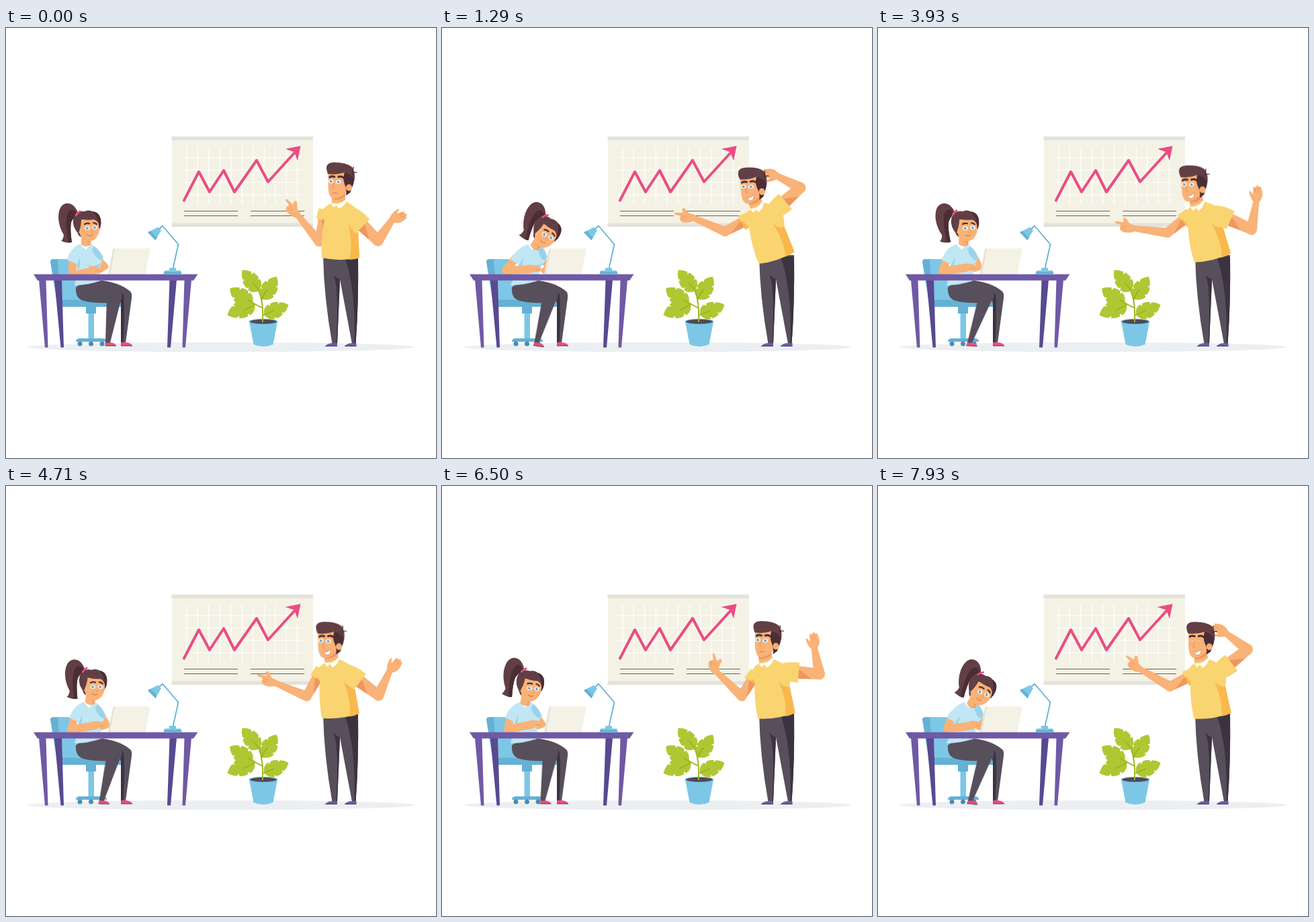
An HTML page without scripts for the animation above (8000 ms loop, 640 by 640 pixels).

```html
<!DOCTYPE html>
<html lang="en">
<head>
<meta charset="utf-8">
<title>Presentation at the office</title>
<style>
html,body{margin:0;width:100%;height:100%;overflow:hidden;background:#fff}
svg{display:block;width:100%;height:100%}
.m{animation:8s cubic-bezier(.35,.22,.65,.78) infinite}
.skin{fill:#f9b277}.shade{fill:#f0965f}
.hair{fill:#613f44}.hair2{fill:#4b2d35}
.blue{fill:#7dc7e6}.blue2{fill:#64b1d5}
.pants{fill:#574f5c}.pants2{fill:#3b3340}
.shirt{fill:#f9d470}.shirt2{fill:#f9b84c}
.top{fill:#c1e7f4}.top2{fill:#9cd2e8}
.line{fill:none;stroke-linecap:round;stroke-linejoin:round}
.brow{stroke:#4b2d35;stroke-width:2.2}
.arm{stroke:#f9b277;stroke-width:12}
.pink{fill:#e94d83}

/* The poses repeat every 6 s; the loop is cut at 8 s. */
@keyframes lean{
0%,75%{rotate:0deg}6.25%,81.25%{rotate:-9deg}16.125%,91.125%{rotate:-19deg}
24.125%,99.125%,100%{rotate:-9.5deg}33.875%{rotate:-2deg}49.125%{rotate:-14deg}67.875%{rotate:-1deg}}
@keyframes manHead{
0%,75%{translate:498px 228px;rotate:0deg}
6.25%,81.25%{translate:484.5px 229px;rotate:0deg}
16.125%,91.125%{translate:463px 235px;rotate:-4deg}
24.125%,99.125%,100%{translate:480.5px 230px;rotate:-1deg}
33.875%{translate:494px 229.5px;rotate:0deg}
49.125%{translate:470px 232px;rotate:-3deg}
67.875%{translate:494.5px 228px;rotate:0deg}}
@keyframes pointUpper{
0%,75%{translate:474px 278px;rotate:101deg}
6.25%,81.25%{translate:464px 284px;rotate:122deg}
16.125%,91.125%{translate:453px 286px;rotate:152deg}
24.125%,99.125%,100%{translate:465px 283px;rotate:153deg}
33.875%{translate:477px 278px;rotate:158deg}
49.125%{translate:459px 282px;rotate:141deg}
67.875%{translate:473px 278px;rotate:100deg}}
@keyframes pointFore{
0%,75%{translate:41px;rotate:130deg}
6.25%,81.25%{translate:34px;rotate:102deg}
16.125%,91.125%{translate:36px;rotate:51deg}
24.125%,99.125%,100%{translate:34px;rotate:57deg}
33.875%{translate:34.5px;rotate:59.5deg}
49.125%{translate:36px;rotate:46deg}
67.875%{translate:40px;rotate:117deg}}
@keyframes pointHand{
0%,75%{rotate:-7deg}6.25%,81.25%{rotate:28deg}16.125%,91.125%{rotate:-20deg}
24.125%,99.125%,100%{rotate:5deg}33.875%{rotate:30deg}49.125%{rotate:4deg}67.875%{rotate:-16deg}}
@keyframes waveUpper{
0%,75%{translate:516px 279px;rotate:45deg}
6.25%,81.25%{translate:509px 275px;rotate:5.4deg}
16.125%,91.125%{translate:494px 272px;rotate:-41deg}
24.125%,99.125%,100%{translate:508px 276px;rotate:-38deg}
33.875%{translate:516px 280px;rotate:-22.5deg}
49.125%{translate:505px 276px;rotate:25deg}
67.875%{translate:514px 279px;rotate:48.6deg}}
@keyframes waveFore{
0%,75%{translate:53px;rotate:-100.5deg}
6.25%,81.25%{translate:53px;rotate:-106.5deg}
16.125%,91.125%{translate:52px;rotate:-112deg}
24.125%,99.125%,100%{translate:53px;rotate:-105deg}
33.875%{translate:57px;rotate:-121deg}
49.125%{translate:56px;rotate:-105deg}
67.875%{translate:56px;rotate:-100.5deg}}
@keyframes waveHand{
0%,75%{translate:39px;rotate:39deg}
6.25%,81.25%{translate:41px;rotate:10deg}
16.125%,91.125%{translate:40px;rotate:-14deg}
24.125%,99.125%,100%{translate:41px;rotate:-7deg}
33.875%{translate:43px;rotate:-17deg}
49.125%{translate:44px;rotate:-5deg}
67.875%{translate:40px;rotate:47deg}}
@keyframes smile{
0%,6.25%,75%,81.25%{scale:.2;opacity:0}
11%,64%,86%,100%{scale:1;opacity:1}
67.875%{scale:.8;opacity:1}
72%{scale:.3;opacity:0}}
@keyframes frown{
0%,6.25%,75%,81.25%{opacity:1}
9%,70%,84%,100%{opacity:0}}
@keyframes blink{
0%,22.8%,25.4%,97.8%{scale:1 1}
24.125%,99.125%,100%{scale:1 .1}}

@keyframes womanHead{
0%,75%{translate:121px 293px;rotate:0deg}
6.25%,81.25%{translate:131px 296px;rotate:11deg}
16.125%,91.125%{translate:155px 303px;rotate:32deg}
24.125%,99.125%,100%{translate:154px 302px;rotate:28deg}
33.875%{translate:152.5px 300.5px;rotate:25deg}
49.125%{translate:130px 293px;rotate:1deg}
67.875%{translate:129.5px 295px;rotate:9deg}}
@keyframes pony{
0%,75%{translate:107px 275px;rotate:0deg}
6.25%,81.25%{translate:122px 273px;rotate:12deg}
16.125%,91.125%{translate:154px 279px;rotate:23deg}
24.125%,99.125%,100%{translate:153px 278px;rotate:23deg}
33.875%{translate:149px 277px;rotate:20deg}
49.125%{translate:114px 274px;rotate:-4deg}
67.875%{translate:120px 272px;rotate:8deg}}
@keyframes bend{
0%,75%{transform:skewX(0deg)}6.25%,81.25%{transform:skewX(-5deg)}
16.125%,91.125%{transform:skewX(-16.5deg)}24.125%,99.125%,100%{transform:skewX(-17deg)}
33.875%{transform:skewX(-17deg)}49.125%{transform:skewX(-6deg)}67.875%{transform:skewX(-4deg)}}
@keyframes nearArm{
0%,75%{d:path("M99 344L99 369L130 361")}
6.25%,81.25%{d:path("M102 344L98 362L134 355")}
16.125%,91.125%{d:path("M110 342L95 361L131 359")}
24.125%,99.125%,100%{d:path("M111 342L103 361L139 357")}
33.875%{d:path("M110 342L99 361L136 359")}
49.125%{d:path("M103 343L96 362L131 357")}
67.875%{d:path("M102 344L98 363L133 356")}}
@keyframes nearHand{
0%,75%{translate:131px 361px}6.25%,81.25%{translate:137px 355px}
16.125%,91.125%{translate:135px 359px}24.125%,99.125%,100%{translate:143px 356px}
33.875%{translate:140px 359px}49.125%{translate:135px 357px}67.875%{translate:137px 356px}}
@keyframes farArm{
0%,75%{d:path("M138 344L148 355L138 361")}
6.25%,81.25%{d:path("M142 343L150 355L142 358")}
16.125%,91.125%{d:path("M150 345L159 357L152 361")}
24.125%,99.125%,100%{d:path("M150 342L157 354L150 359")}
33.875%{d:path("M150 344L158 357L148 361")}
49.125%{d:path("M146 344L151 356L141 359")}
67.875%{d:path("M143 344L151 356L142 359")}}
@keyframes shin{
0%,75%{transform:skewX(0deg)}6.25%,81.25%{transform:skewX(-1.2deg)}
16.125%,91.125%{transform:skewX(-8.5deg)}24.125%,99.125%,100%{transform:skewX(-11.3deg)}
33.875%{transform:skewX(-13.3deg)}49.125%{transform:skewX(-12deg)}67.875%{transform:skewX(-3.3deg)}}
@keyframes foot{
0%,33.875%,75%{rotate:0deg}6.25%,67.875%,81.25%{rotate:0deg}
16.125%,91.125%{rotate:8deg}24.125%,99.125%,100%{rotate:6deg}49.125%{rotate:4deg}}
</style>
</head>
<body>
<svg viewBox="0 0 640 640">
<defs>
<path id="leaf" d="M0 0Q2-11 12-13L14-9.500L16-13Q23-14 28-10.500L27-7.500L31-9Q38-6 42 0Q37 6 31 9L27.500 6.500L28 10.500Q22 13 17 12.500L14 9L13.500 12.500Q4 11 0 0Z"/>
<g id="eye"><ellipse rx="3.700" ry="2.900" fill="#fff"/><circle r="2.300" fill="#7fc0e3"/><circle r=".9" fill="#4b7391"/><circle cx="1" cy="-1" r=".7" fill="#fff"/></g>
<pattern id="grid" x="260.6" y="183.5" width="16.5" height="18.5" patternUnits="userSpaceOnUse"><path d="M8.25 0V18.5M0 9.25H16.5" stroke="#fff" stroke-width="1.2"/></pattern>
</defs>

<ellipse cx="321" cy="475" rx="288" ry="7.2" fill="#eceff2"/>

<!-- board -->
<path d="M247 162H457V296H247Z" fill="#f4f2e5"/>
<path d="M246.500 161.500H457V167H246.500ZM246.500 290.500H457V296H246.500Z" fill="#e3e2db"/>
<path d="M262 177H440V262H262Z" fill="url(#grid)"/>
<path class="line" d="M265 256.500L287 214L303 244L324 212L340 244L373 197L390 229L431 184" stroke="#e94d83" stroke-width="4"/>
<path class="pink" d="M438.500 175.500L415.500 180L429 184.500L434 197.500Z"/>
<path d="M265 272.500H345M364 272.500H444M265 279.500H345M364 279.500H444" stroke="#66645f"/>

<!-- plant -->
<path class="blue" d="M362 437L368.500 471Q383 477.500 397.500 471L404 437Z"/>
<ellipse class="blue2" cx="383" cy="437" rx="21.300" ry="4.200"/>
<ellipse cx="383" cy="437" rx="19.500" ry="3.200" fill="#4f4955"/>
<g fill="#b0c733">
<use href="#leaf" transform="translate(377 391)rotate(-129)scale(.95)"/>
<use href="#leaf" transform="translate(382 404)rotate(-58)scale(.95)"/>
<use href="#leaf" transform="translate(367 411)rotate(-145)scale(.98)"/>
<use href="#leaf" transform="translate(370 410)rotate(157)scale(1.05)"/>
<use href="#leaf" transform="translate(384 427)rotate(-22)scale(.94)"/>
</g>
<path class="line" d="M382 437Q383 400 374 387L368 380M380 406Q383 396 389 390M382 417Q372 412 360 405M371 411Q362 417 354 420M382 428L398 421" stroke="#9bb51f" stroke-width="1.900"/>

<!-- chair -->
<path class="blue2" d="M66 348q0-4 4-4h14l8 71h-10q-5 0-6-6z"/>
<path class="blue" d="M77 348q0-4 4-4h22l6 60h63v5H83z"/>
<path class="blue2" d="M83 404.500H172V415H88Q84 415 83 409ZM119 415H134V425H119ZM104 467Q104 462 110 462H144Q150 462 150 467Z"/>
<path class="blue" d="M122.500 425H131V462H122.500Z"/>
<g fill="#4a8db2"><circle cx="110" cy="470" r="3.500"/><circle cx="126.500" cy="470" r="3.500"/><circle cx="143" cy="470" r="3.500"/></g>

<!-- woman -->
<path class="pants" d="M136 375Q170 378 186 393Q188 397 187 402L178 469H171V410Q165 392 136 375Z"/>
<path class="pants2" d="M143 380Q168 387 175 397Q177 420 174.500 469H171V400Z"/>
<path class="pink" d="M171 473V468Q176 467 179 468Q187 469 188 473Z"/>
<path d="M171 472.500H188V473.500H171Z" fill="#5b3c50"/>
<g class="m" style="animation-name:shin;transform-origin:165px 398px">
<g class="m" style="animation-name:foot;transform-origin:151px 469px"><path class="pink" d="M147.500 473V468Q151 467 155 468Q163 469 164 473Z"/><path d="M147.500 472.500H164V473.500H147.500Z" fill="#5b3c50"/></g>
<path class="pants" d="M150 400Q164 410 173 397L155 468.500H148Z"/>
</g>
<path class="pants" d="M104 386Q120 371 148 379Q177 387 172 402Q166 409 152 409Q120 410 109 403Q103 397 104 386Z"/>

<path class="line arm m" style="animation-name:farArm;stroke-width:9" d="M138 344L148 355L138 361"/>
<g class="m" style="animation-name:pony">
<path class="hair" d="M1 2Q-5-15-17-14Q-29-12-29 8Q-28 22-21 33Q-22 40-25 42Q-15 46-9 44Q-12 24-10 14Q-6 5 1 2Z"/>
<path class="hair2" d="M0 2Q-9-10-15 0Q-20 14-14 44L-9 44Q-12 24-10 14Q-6 5 0 2Z"/>
</g>
<g class="m" style="animation-name:bend;transform-origin:120px 382px">
<path class="top" d="M112 321Q96 326 94 342L105 350L106 362L102 383Q122 383 141 376L139 356L145 342Q137 326 126 321Z"/>
<path class="top2" d="M106 332Q114 346 107 362L105 350ZM128 330Q132 342 142 346L145 342Q139 330 131 325ZM117 351Q130 358 140 350L139 355Q128 359 117 351Z"/>
<path d="M110 322L119 330L127 321L123 318H112Z" fill="#fff"/>
</g>
<path class="line arm m" style="animation-name:nearArm" d="M99 344L99 369L130 361"/>
<g class="m" style="animation-name:nearHand"><path class="skin" d="M-8-5.500Q1-8 8-4.500L13-1Q13 3 8 4L-7 5Z"/><path class="line" d="M3 0L10 1" stroke="#f0965f"/></g>
<g class="m" style="animation-name:bend;transform-origin:120px 382px"><path class="top" d="M112 322Q95 327 91 345L106 352Q111 340 112 332Z"/></g>
<g class="m" style="animation-name:womanHead">
<path class="shade" d="M-9 15H5L5 29Q-1 35-9 29Z"/>
<path class="skin" d="M-9 15V29Q-4 33 0 31L5 27Q-3 26-5 18Z"/>
<path class="hair2" d="M-15-10Q-20 10-10 18L2 0L19 6Q21-8 10-12Z"/>
<path class="skin" d="M-12-8V10Q-9 24 1 25Q15 24 18 8L17-8Z"/>
<ellipse class="skin" cx="-12" cy="8.500" rx="3.500" ry="4.300"/>
<path class="hair" d="M-11 6Q-13 12-12 14Q-23 4-21-9Q-18-22-4-20Q2-23 8-20Q22-18 20 1L18 5Q18-5 10-8Q-2-6-9-9Q-9 0-11 6Z"/>
<path class="hair2" d="M8-20Q22-18 20 1L18 5Q18-9 8-20Z"/>
<use href="#eye" x="0" y="5"/><use href="#eye" x="11" y="4"/>
<path class="line brow" d="M-4-1Q-1-3 3-2M9-3Q12-3 14-1"/>
<path class="line" d="M7 6L8 11L5 11" stroke="#f0965f"/>
<path class="line" d="M0 15Q4 18 8 15" stroke="#d87950" stroke-width="1.200"/>
</g>
<g class="m" style="animation-name:pony"><path class="line" d="M-3 4Q-1 0 3-2" stroke="#e94d83" stroke-width="2.800"/></g>

<!-- desk -->
<path d="M152 366.500L159 330Q159.500 328 162 328H213Q215 328 214.500 330L207.500 366.500Z" fill="#f4f2e5"/>
<path d="M152 366.500L159 330Q159.500 328 162 328L155 366.500Z" fill="#e5e3d9"/>
<path d="M72 375H83L86 475.500H81.500ZM243.500 375H254L245 475.500H240Z" fill="#594990"/>
<path d="M49 375H59.500L62.500 475.500H58ZM265.500 375H276L267 475.500H262.500ZM41 366.400H285.500L279 375.800H47Z" fill="#7059a5"/>
<path class="line" d="M248.500 358L256.500 322L233 294.500L227 300" stroke="#64b1d5" stroke-width="1.800"/>
<path class="blue" d="M236 361H260L261.500 366.500H234.500ZM243 357H253V362H243ZM226 296.500L231 301L222.500 316L211 304Z"/>
<path class="blue2" d="M234.500 366.500L235.500 363H260.500L261.500 366.500ZM211 304L222.500 316L224.500 312L215 302Z"/>

<!-- man -->
<path class="pants" d="M472 338H524Q525 410 520.500 470H515L497 374L493 470H485.500Q473 400 472 338Z"/>
<path class="pants2" d="M504 340H524Q525 410 520.500 470H518.500Q521 390 504 340ZM487 367Q493 373 497 374L493 470H491.500Q496 384 487 367Z"/>
<path d="M475 474Q478 469 487 469H493V474ZM504 474Q507 469 516 469H521.500V474Z" fill="#7059a5"/>
<path d="M475 473H493V474H475ZM504 473H521.500V474H504Z" fill="#493b73"/>
<g class="m" style="animation-name:pointUpper">
<path class="skin" d="M0-8L38-7V7L0 8Z"/>
<path class="shade" d="M5-8L30-7L8 3Z"/>
<g class="m" style="animation-name:pointFore;translate:41px">
<circle class="skin" r="7.300"/><path class="skin" d="M0-7.300L54-4V4.300L0 7.300Z"/>
<g transform="translate(53 0)"><g class="m" style="animation-name:pointHand">
<path class="skin" d="M-3-4.500C3-8 10-9 15-7C19-5 19-1 17 1.500L26 3Q28.500 5 25.500 6L14 6.500L16 11Q15.500 14.500 12 13L5 6L-3 4.500Z"/>
<path class="line" d="M10-3L16-2M10 1L17 1.500" stroke="#f0965f" stroke-width=".8"/>
</g></g></g>
<path class="shirt" d="M-8-11L8-12L8 11L-8 10Z"/><path class="shirt2" d="M-8-11L8-12L8 3Z"/>
</g>
<g class="m" style="animation-name:lean;transform-origin:498px 342px">
<path class="shade" d="M485 242H505V260Q494 270 485 263Z"/>
<path class="skin" d="M485 254Q497 258 505 250V260Q494 270 485 263Z"/>
<path class="shirt" d="M486 260Q473 265 469 276L474 286Q468 316 470 342Q498 348 526 342L524 302Q529 288 528 276Q518 264 506 258Z"/>
<path class="shirt2" d="M509 291Q514 302 524 302L526 342Q519 345 511 345Q517 322 509 291Z"/>
<path d="M484 261L487 267L492 264L495 269Q503 266 507 258L504 256Q496 264 487 261Z" fill="#fff"/>
</g>
<g class="m" style="animation-name:waveUpper">
<path class="skin" d="M0-10L52-8V8L0 10Z"/>
<path class="shade" d="M20 10L22-4L42 8.300Z"/>
<g class="m" style="animation-name:waveFore;translate:53px">
<circle class="skin" r="8.300"/><path class="skin" d="M0-8.300L42-4.300V4.300L0 8.300Z"/>
<g class="m" style="animation-name:waveHand;translate:40px">
<path class="skin" d="M-3-4.300Q3-10 11-12Q15-12 12-9.500L8-6L18-6.500Q22-5.500 18-3.500L21-2Q24 0 20 1L20 2.500Q22 5 18 5.500Q10 9.500 4 7.500L-3 4.300Z"/>
<path class="line" d="M12-3L18-3.500M12 1L20 1" stroke="#f0965f" stroke-width=".8"/>
</g></g>
<path class="shirt" d="M-12-7Q0-15 22-14L22 16Q8 15 0 13Q-10 8-12-7Z"/>
</g>
<g class="m" style="animation-name:manHead">
<path class="skin" d="M-18.500-14V8Q-18 26-9 26Q2 25 10 14V-14Z"/>
<path class="hair" d="M-19-11Q-26-28-9-28Q9-28 17-21Q24-10 19 4L14 17L8 21Q10 12 6 4Q3-4 6-13Q-7-9-19-11Z"/>
<path class="hair2" d="M6-13Q16-10 20-3L19 4L14 17L8 21Q10 12 6 4Q3-4 6-13Z"/>
<path class="line" d="M18-10L19-21M18-12Q21-14 24-13" stroke="#4b2d35" stroke-width="1.300"/>
<ellipse class="skin" cx="12.500" cy="9.500" rx="4.500" ry="5"/>
<path class="line" d="M11 11Q12 7 15 7" stroke="#f0965f"/>
<g transform="translate(1.800 0)">
<g transform="translate(-16 0)"><use class="m" style="animation-name:blink" href="#eye"/></g>
<g transform="translate(-5 1)"><use class="m" style="animation-name:blink" href="#eye"/></g>
<path class="line brow" style="stroke-width:3" d="M-18-6Q-16-8-11-6.500M-5-6.500Q-1-8 3-5"/>
<path class="line" d="M-12 3L-14 9L-11 10" stroke="#f0965f" stroke-width="1.300"/>
<path class="line m" style="animation-name:frown" d="M-13 18Q-10 16.500-7 18" stroke="#d87950" stroke-width="1.200"/>
<g transform="translate(-7 17)"><path class="m" style="animation-name:smile" d="M-5 0Q1 1 5-4Q6 4 0 5Q-4 4-5 0Z" fill="#fff" stroke="#d87950" stroke-width=".8"/></g>
</g>
</g>
</svg>
</body>
</html>
```
